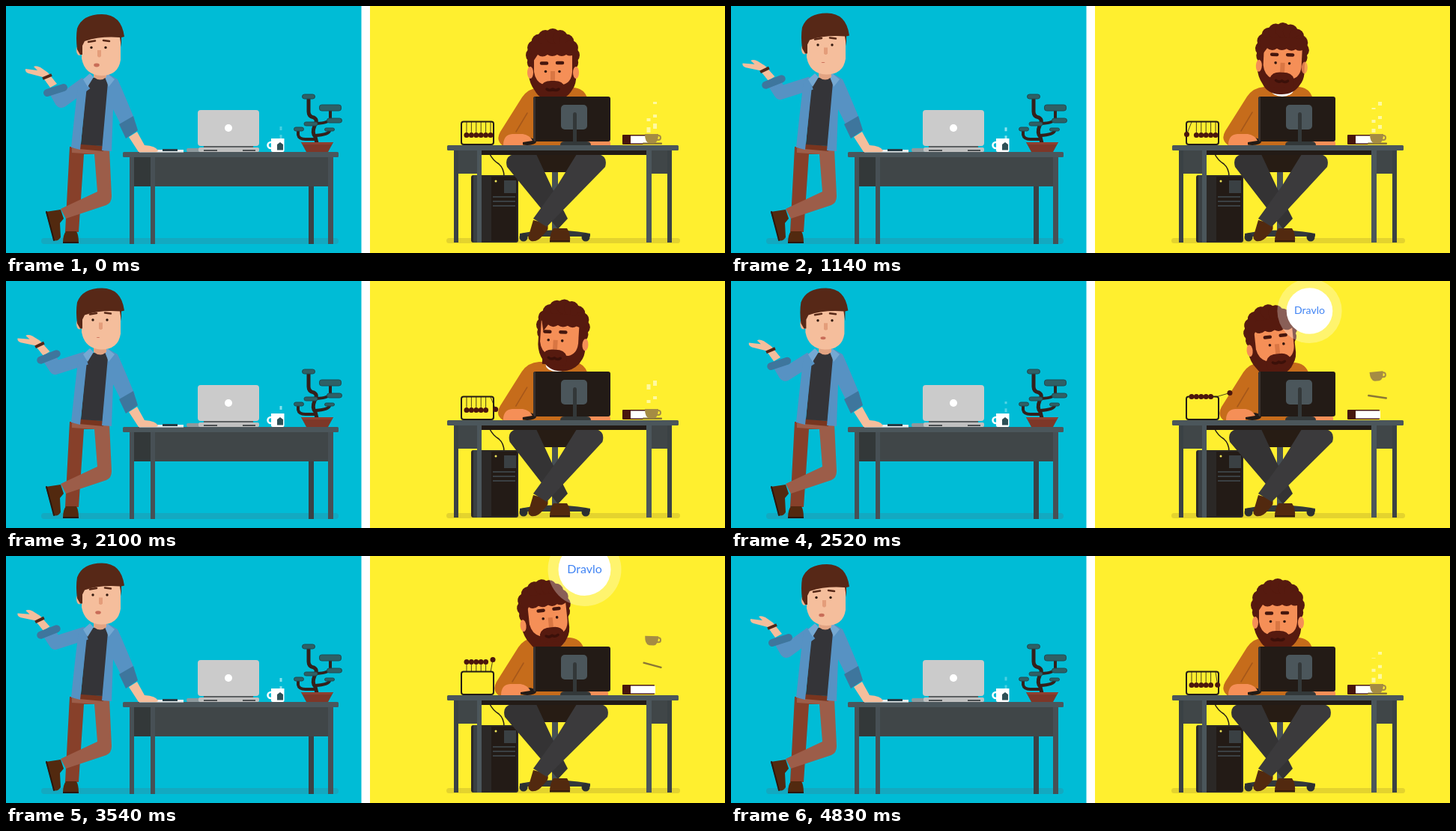
Write an HTML page that moves like this. It is 960 by 330 pixels and loops after 4860 ms.

```html
<!DOCTYPE html>
<html lang="en">
<head>
<meta charset="utf-8">
<title>Two desks</title>
<style>
html, body { margin: 0; width: 100%; height: 100%; overflow: hidden; background: #fff; }
svg { display: block; }
.top { fill: #4b565b; } .leg { fill: #475055; } .back { fill: #3a4144; } .panel { fill: #404648; } .dark { fill: #333839; }
.skin { fill: #f5be9c; } .jacket { fill: #5792c3; } .cuff { fill: #3e769d; } .shoe { fill: #52290f; }
.tan { fill: #f58f57; } .beard { fill: #561a0f; } .sweater { fill: #c66c1b; } .black { fill: #231b16; }
.line { fill: none; } .round { fill: none; stroke-linecap: round; stroke-linejoin: round; }
</style>
</head>
<body>
<svg width="960" height="330" viewBox="0 0 960 330">
<path fill="#00bcd6" d="M0 0H474.500V330H0Z"/>
<path fill="#ffef2f" d="M486 0H960V330H486Z"/>

<!-- left desk -->
<rect x="47" y="310" width="397" height="8" rx="4" fill="#13a9c1"/>
<path class="panel" d="M171 201H431V241H171Z"/>
<path class="dark" d="M171 201H193V241H171Z"/>
<path class="leg" d="M165 200h6V318h-6ZM193 200h6V318h-6ZM430 200h7V318h-7Z"/>
<path class="back" d="M404 241h7V318h-7Z"/>
<rect class="top" x="156" y="195" width="288" height="7" rx="1.500"/>
<path fill="#e9eff0" d="M178 192H237V195.500H178Z"/>
<path fill="#263c45" d="M209 191h20v3h-20Z"/>
<rect x="241" y="190" width="18" height="5" rx="2" fill="#8e999d"/>
<rect x="264" y="184" width="66" height="7" fill="#5b5f61"/>
<rect x="256" y="139" width="82" height="48" rx="4" fill="#cbcbcb"/>
<circle cx="297" cy="163" r="5" fill="#fff"/>
<rect x="257" y="189" width="81" height="6" rx="2" fill="#c0c0c0"/>
<path fill="#4b4f51" d="M264 192h18v2h-18ZM316 192h17v2h-17Z"/>
<circle cx="353.500" cy="186" r="4" class="line" stroke="#fff" stroke-width="2.500"/>
<path id="teaSteam" class="line" stroke="#b6f0f6" stroke-width="3" stroke-dasharray="5 6" d="M367 177V161"/>
<path fill="#fff" d="M354 177h17.500v16q0 2-2 2h-13.500q-2 0-2-2Z"/>
<path fill="#2e4f55" d="M362 185l4-3 4 3v7.500h-8Z"/>
<g class="round" stroke="#34201b" stroke-width="4">
<path d="M404 122V141Q404 148 411 149Q417 152 412 160Q408 170 413 175L415 183" stroke-width="5"/>
<path d="M433 138V150Q432 156 415 157M390 166V172Q391 178 400 178H413M432 167Q430 172 413 173"/>
</g>
<g fill="#2f6065" stroke="#1f4b52">
<rect x="395.500" y="118" width="17" height="6" rx="3"/><rect x="418.500" y="132" width="29" height="8" rx="3"/>
<rect x="428.500" y="150" width="20" height="6" rx="3"/><rect x="398" y="155" width="18" height="5" rx="2.500"/>
<rect x="384.500" y="162" width="13" height="5" rx="2.500"/><rect x="425.500" y="163" width="13" height="4" rx="2"/>
</g>
<path fill="#7d3728" d="M394 182H437L430 195H401Z"/>
<path fill="#8d4030" d="M394 182H437L435 185H396Z"/>

<!-- standing man -->
<path fill="#87402a" d="M85 188H118V198H104L97 302H79Z"/>
<path class="shoe" d="M80 301H94Q97 306 97 316H76Q76 306 80 301Z"/>
<path fill="#2b160b" d="M76 315h21v2h-21Z"/>
<path fill="#9c5d49" d="M88 190L138 191L141 254Q141 263 134 266L80 284L73 271L122 248L118 198L88 196Z"/>
<path class="shoe" d="M53 275L73 272L77 284L72 290L73 309Q69 315 64 313Z"/>
<path class="round" stroke="#2b160b" stroke-width="2" d="M54 275L64 313"/>
<path fill="#78351f" d="M99 184L130 187V194L98 191Z"/>
<path fill="#343438" d="M108 96H138L129 187L100 185Z"/>
<path class="skin" d="M164 175L175 168L185 186Q200 187 203 193Q203 195 198 195H177Z"/>
<path class="jacket" d="M137 91L149 98Q153 106 172 152L156 164L143 138L141 194L128 193Z"/>
<path class="cuff" d="M151 158L170 147L176 166L160 177Z"/>
<g id="hand">
<path class="skin" d="M59 109L49 95L30 90Q25 88 26 84L42 86L37 81Q40 79 46 82L56 89L68 104Z"/>
<path class="line" stroke="#512719" stroke-width="4" d="M49 97L61 92"/>
</g>
<g id="arm" class="round" stroke="#5792c3">
<path id="sleeve" stroke-width="18" style="stroke-linecap: butt"/>
<path id="cuff" class="line" stroke="#3e769d" stroke-width="10" d="M-11 3L11 -4"/>
</g>
<path class="jacket" d="M113 91L97 101Q93 130 87 189L99 192L109 98Z"/>
<path fill="#75a8d2" d="M112 90L103 98L109 108L117 95ZM135 90L145 98L137 108L132 95Z"/>
<path fill="#e2a382" d="M117 84H134V95Q126 102 117 95Z"/>
<g id="leftHead">
<path class="skin" d="M101 34H153V72Q150 93 127 93Q105 92 101 70Z"/>
<ellipse cx="98" cy="59" rx="4" ry="7" fill="#eeb28f"/>
<path fill="#572817" d="M95 58Q93 42 95 30Q102 11 128 11Q154 11 158 41L154 42V55L152 42Q126 40 105 47L102 53V65H99Z"/>
<g id="leftFace">
<path class="round" stroke="#572817" stroke-width="2.500" d="M110 48L119 46.500M130 46L138 47"/>
<circle cx="114" cy="55.500" r="1.700" fill="#32190f"/><circle cx="133" cy="55.500" r="1.700" fill="#32190f"/>
<path fill="#e49d7a" d="M122 59h5v8q-2.500 3-5 0Z"/>
<ellipse id="mouth" cx="121" cy="79" fill="#c96d58"/>
</g>
</g>

<!-- right desk, back -->
<rect x="588" y="310" width="312" height="7" rx="3.500" fill="#e4d32e"/>
<path class="line" stroke="#231b16" stroke-width="1.500" d="M646 198Q650 206 658 211Q665 217 665 228"/>
<rect x="621" y="226" width="63" height="90" rx="3" fill="#2b2826"/>
<path fill="#3a4043" d="M624 226h5v90h-5Z"/>
<path class="black" d="M648 228h34v86h-34Z"/>
<path fill="#3a4043" d="M665 233h16v17h-16ZM650 254h30v2h-30ZM650 260h30v2h-30ZM650 266h30v2h-30Z"/>
<circle cx="654" cy="234" r="1.500" fill="#f0e65c"/>
<path fill="#271c14" d="M695 196H775L765 219Q763 222 758 222H711Q706 222 704 217Z"/>
<path class="leg" d="M729 222h8v80h-8Z"/>
<path fill="#33383b" d="M686 304Q733 295 780 304V308H686Z"/>
<circle cx="691" cy="309" r="5.500" fill="#2b2f31"/><circle cx="774" cy="309" r="5.500" fill="#2b2f31"/>
<path class="shoe" d="M704 286L722 291Q727 297 718 305Q710 316 701 314Q695 311 699 303Z"/>
<path class="shoe" d="M731 297H749Q754 304 753 315H726Q726 304 731 297Z"/>
<path fill="#2b160b" d="M726 313.500h27v2h-27Z"/>
<path id="legA" fill="#343334"/>
<path id="legB" fill="#3b3a3c"/>

<!-- sitting man -->
<g id="torso">
<path class="sweater" d="M712 109Q697 110 689 122L660 168Q653 180 664 187H800V160L776 122Q771 110 758 109Z"/>
<path class="round" stroke="#a5571a" stroke-width="1.500" d="M696 143L681 168"/>
<ellipse cx="736" cy="113" rx="15" ry="9" fill="#fff"/>
</g>
<g id="rightHead">
<g id="hair" class="beard">
<path d="M698 50Q730 26 761 50V92Q762 104 756 112Q748 126 730 126Q713 126 706 113Q699 104 698 92Z"/>
</g>
<path id="skin" class="tan" d="M705 60H756V88Q755 102 744 105H717Q707 101 705 88Z"/>
<ellipse id="earL" class="tan" cx="700" cy="89" rx="4" ry="8"/>
<ellipse id="earR" class="tan" cx="761" cy="89" rx="4" ry="8"/>
<path class="beard" d="M699 50H761V63Q754 69 748 65Q742 69 736 65Q729 69 723 65Q716 70 710 65L704 74Z"/>
<g id="rightFace">
<path class="round" stroke="#45160d" stroke-width="4.500" d="M715 73.500H722M736 73H743"/>
<circle cx="720.500" cy="84.500" r="1.800" fill="#32150d"/><circle cx="739" cy="84.500" r="1.800" fill="#32150d"/>
<path fill="#d97643" d="M727 84h6v14h-6Z"/>
<path class="beard" d="M714 105Q717 96 730 97Q743 96 746 105V117H714Z"/>
<path class="round" stroke="#3b1009" stroke-width="3.500" d="M722 108Q726 111 730 108Q734 111 738 108"/>
</g>
</g>

<!-- right desk, front -->
<ellipse class="black" cx="696" cy="181" rx="12" ry="5"/>
<g id="arms" class="tan">
<path d="M664 186Q664 172 676 171H690Q700 173 703 180L690 182V187H667Z"/>
<path d="M776 176H800Q808 177 807 187H776Z"/>
</g>
<path class="panel" d="M604 192h25v32h-25ZM862 192h21v32h-21Z"/>
<path class="back" d="M598 192h6v124h-6ZM883 192h6v124h-6Z"/>
<path class="top" d="M629 192h6v124h-6ZM855 192h7v124h-7Z"/>
<path class="black" d="M635 192H855V199H635Z"/>
<rect class="top" x="589" y="186" width="309" height="7" rx="1.500"/>
<rect x="704" y="121" width="103" height="60" rx="3" class="black"/>
<path fill="#3a3330" d="M704 124q0-3 3-3v60q-3 0-3-3Z"/>
<rect class="top" x="741" y="132" width="35" height="33" rx="5"/>
<path class="dark" d="M757 145q0-3 2.500-3t2.500 3v36h13q6 0 6 5h-41q0-5 6-5h11Z"/>
<rect x="823" y="172" width="43" height="13" rx="1" fill="#47160e"/>
<path fill="#fff" d="M834 173.500H867V183.500H834Z"/>
<g id="steam" class="line" stroke="#fff9a0" stroke-width="5" stroke-dasharray="7 8 4 14">
<path d="M858 169V136"/><path d="M866.500 164V128"/>
</g>
<rect id="saucer" x="850" y="182.500" width="26" height="2.500" rx="1" fill="#8b7735"/>
<g id="cup">
<circle cx="871" cy="176" r="3" class="line" stroke="#a58c43" stroke-width="2"/>
<path fill="#a58c43" d="M853 171H871Q871 183 865 183.500H859Q853 182 853 171Z"/>
</g>
<rect class="line" stroke="#231b16" stroke-width="2" x="608" y="154.500" width="43" height="30.500" rx="3"/>
<g id="cradle"></g>
<g id="bubble">
<circle r="49" fill="#fff" opacity=".3"/><circle r="35" fill="#fff"/>
<text y="5" text-anchor="middle" font-family="Lato, sans-serif" font-size="16" fill="#4285f4">Dravlo</text>
</g>
</svg>
<script>
const LOOP = 4860, TAU = Math.PI * 2;
const $ = id => document.getElementById(id);

function ramp(t, from, to) {
  return Math.min(1, Math.max(0, (t - from) / (to - from)));
}
function ease(t, from, to) {
  const p = ramp(t, from, to);
  return p * p * (3 - 2 * p);
}
// Eases up to 1 at `on` and back to 0 at `off`
function pulse(t, on, off, rise = 350, fall = rise) {
  return ease(t, on, on + rise) - ease(t, off, off + fall);
}
function set(el, attrs) {
  for (const name in attrs) el.setAttribute(name, attrs[name]);
}
function move(id, x, y, turn = 0, cx = 0, cy = 0) {
  set($(id), { transform: `translate(${x} ${y}) rotate(${turn} ${cx} ${cy})` });
}
function add(parent, tag, attrs) {
  const el = document.createElementNS('http://www.w3.org/2000/svg', tag);
  set(el, attrs);
  return $(parent).appendChild(el);
}

// Curls around the top of the head
for (let i = 0; i < 11; i++) {
  const angle = Math.PI * (1.12 - i * .124 + .0) ;
  add('hair', 'circle', { cx: 730 + 26 * Math.cos(angle), cy: 66 - 26 * Math.sin(angle), r: 10 });
}

const balls = Array.from({ length: 6 }, (_, i) => ({
  x: 615 + i * 6.4,
  string: add('cradle', 'line', { stroke: '#231b16', 'stroke-width': .8 }),
  ball: add('cradle', 'circle', { r: 3.5, fill: '#4b160d' })
}));

function drawStandingMan(t) {
  const turn = pulse(t, 350, 4400);
  const lift = .2 * turn + .8 * (pulse(t, 850, 2230, 230) + pulse(t, 3300, 4400, 230, 320));
  move('leftHead', -2 * turn * (1 - lift), -1.5 * turn);
  move('leftFace', turn * (4 - 2 * lift), -turn * (1 + lift));

  const open = Math.abs(Math.cos(Math.PI * 15 * t / LOOP));
  set($('mouth'), { rx: 2.4 + 1.4 * open, ry: .4 + 2 * open });

  move('hand', -10 * lift, -9 * lift, -3 * lift, 54, 95);
  const x = 66 - 9 * lift, y = 113 - 11 * lift;
  move('cuff', x, y, -4 * lift);
  set($('sleeve'), { d: `M107 103L${74 - 8 * lift} ${127 - 11 * lift}L${x} ${y}` });
}

function drawSittingMan(t, climb) {
  const glance = pulse(t, 250, 1000), away = pulse(t, 1000, 2050);
  const dream = pulse(t, 2050, 3740, 350, 210), back = pulse(t, 3740, 4300, 210, 400);
  const lean = dream + back;
  const faceX = 8 * glance - 10 * away + 7 * dream + 5 * back;

  move('rightHead', 14 * away - (8 + 2 * climb) * dream - back, -9 * glance - 6 * away + dream + 7 * back,
    2 * glance + 4 * away - 6 * dream, 730, 85);
  move('rightFace', faceX, 3 - 4 * glance - 2 * away - (3 + 2 * climb) * dream + back);
  move('skin', faceX * .5, 0);
  set($('earL'), { opacity: ease(faceX, -6, 0) });
  set($('earR'), { opacity: ease(-faceX, -6, 0) });

  move('torso', -5 * lean, -glance - away);
  move('arms', -3 * lean, 0);
  const spread = 3 * lean - 4 * (glance + away), left = 669 - spread, right = 800 + spread;
  set($('legA'), { d: `M${left + 9} 198H708L729 243L750 284L737 298L${left} 215Q${left - 4} 201 ${left + 9} 198Z` });
  set($('legB'), { d: `M${right - 9} 198H762L736 240L704 284L722 295L${right} 215Q${right + 4} 201 ${right - 9} 198Z` });
}

function drawCradle(t, float, climb) {
  const swing = -12 * Math.sin(TAU * t / 810) * (1 - float);
  balls.forEach(({ x, string, ball }, i) => {
    const first = i === 0, last = i === balls.length - 1;
    const dx = first ? Math.min(0, swing) : last ? Math.max(0, swing) : 0;
    const px = x + dx + (last ? float * (19 - 16 * climb) : 0);
    const py = 172.5 - dx * dx / 40 - float * (18 + 13 * climb + (last ? 5 - 2 * climb : 0));
    set(string, { x1: x, y1: 155, x2: px, y2: py });
    set(ball, { cx: px, cy: py });
  });
}

function draw(t) {
  const float = pulse(t, 2230, 3760, 260, 230), climb = ramp(t, 2520, 3540);
  const hop = pulse(t, 3980, 4100, 90);
  drawStandingMan(t);
  drawSittingMan(t, climb);
  drawCradle(t, float, climb);

  move('cup', 0, -float * (50 + 14 * climb) - 3 * hop, float * (7 * climb - 5) - 10 * hop, 863, 177);
  move('saucer', 0, -float * (29 + 9 * climb) - 2 * hop, float * (8 + 7 * climb), 863, 184);
  set($('steam'), { opacity: Math.max(0, 1 - 4 * float), 'stroke-dashoffset': -t / LOOP * 33 * 4 });
  set($('teaSteam'), { 'stroke-dashoffset': -t / LOOP * 88, opacity: .4 + .4 * Math.sin(TAU * t / 1620) ** 2 });

  const grow = pulse(t, 2230, 3560, 250, 180);
  set($('bubble'), {
    transform: `translate(772.5 ${60 - 20 * ease(t, 2230, 2480) - 22 * climb}) scale(${grow * (.88 + .12 * climb)})`
  });
}

function frame() {
  draw(performance.now() % LOOP);
  requestAnimationFrame(frame);
}
frame();
</script>
</body>
</html>
```
